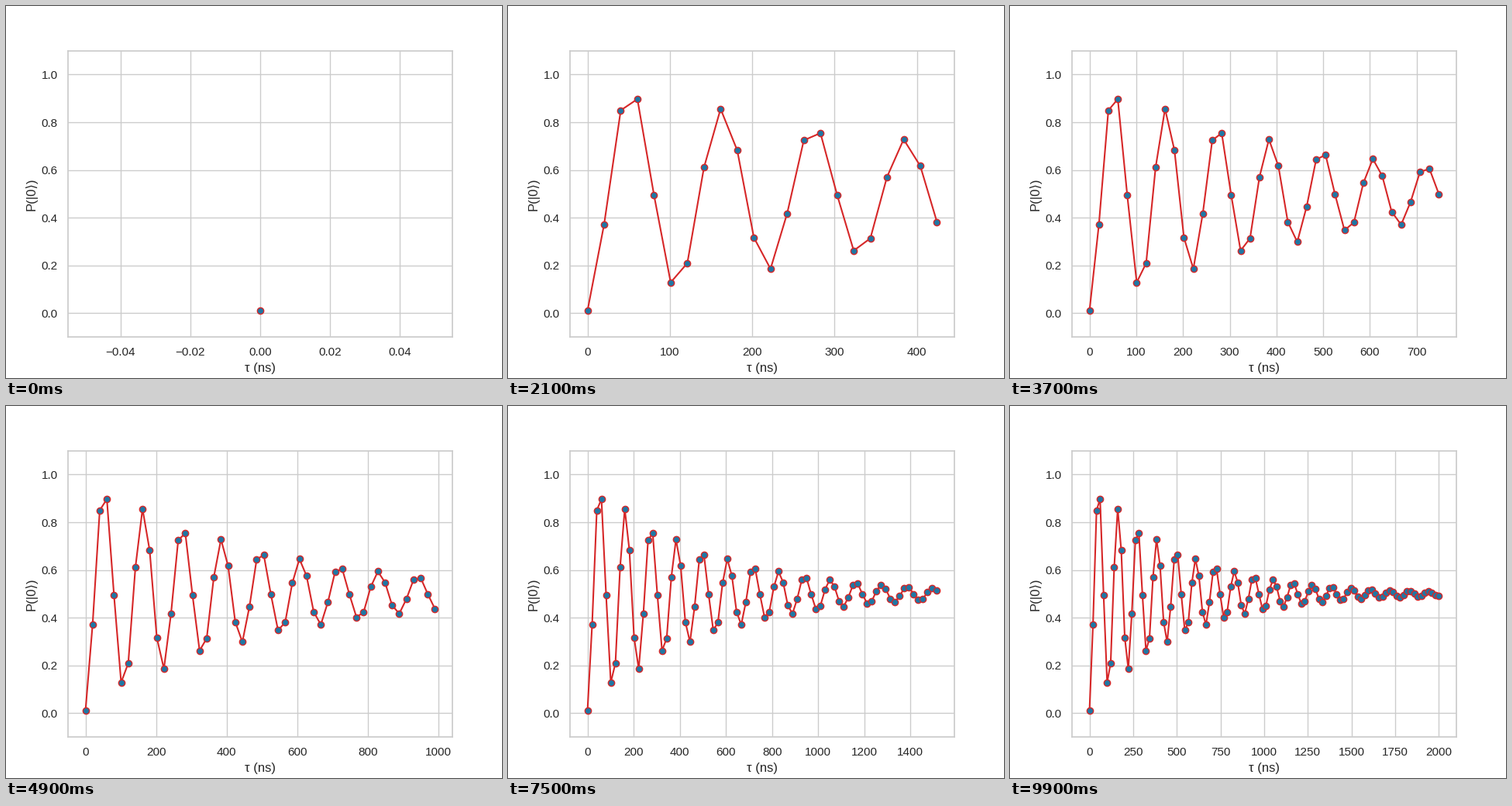
Recreate the animation shown at these times as a matplotlib script. Size 640 by 480 pixels, loop 10000 ms.

```python
import numpy as np
import matplotlib.pyplot as plt
from matplotlib.animation import FuncAnimation

INK = "0.15"
GRID = "0.8"

plt.rcParams.update({
    "font.family": ["Liberation Sans", "DejaVu Sans"],
    "text.color": INK,
    "axes.labelcolor": INK,
    "axes.labelsize": 12,
    "axes.edgecolor": GRID,
    "axes.linewidth": 1.25,
    "axes.axisbelow": True,
    "axes.grid": True,
    "grid.color": GRID,
    "grid.linewidth": 1,
    "xtick.color": INK,
    "ytick.color": INK,
    "xtick.labelsize": 11,
    "ytick.labelsize": 11,
    "xtick.major.size": 6,
    "ytick.major.size": 6,
    "xtick.bottom": False,
    "ytick.left": False,
    "lines.solid_capstyle": "round",
})

# Damped Rabi oscillation: 9 MHz, 500 ns decay time
N = 100
tau = np.linspace(0, 2000, N)
prob = 0.5 - 0.496 * np.exp(-tau / 500) * np.cos(2 * np.pi * 0.009 * tau + np.pi / 20)

fig, ax = plt.subplots(figsize=(6.4, 4.8), dpi=100)
line, = ax.plot([], [], "o-", color="#d62728", lw=1.5, ms=6,
                markerfacecolor="#1f77a4", markeredgewidth=1)
ax.set_ylim(-0.1, 1.1)
ax.set_xlabel("τ (ns)")
ax.set_ylabel("P(|0⟩)")


def update(i):
    line.set_data(tau[:i + 1], prob[:i + 1])
    ax.relim()
    ax.autoscale_view(scaley=False)
    return line,


anim = FuncAnimation(fig, update, frames=N, interval=100, repeat=True,
                     repeat_delay=0, blit=False)
plt.show()
```
